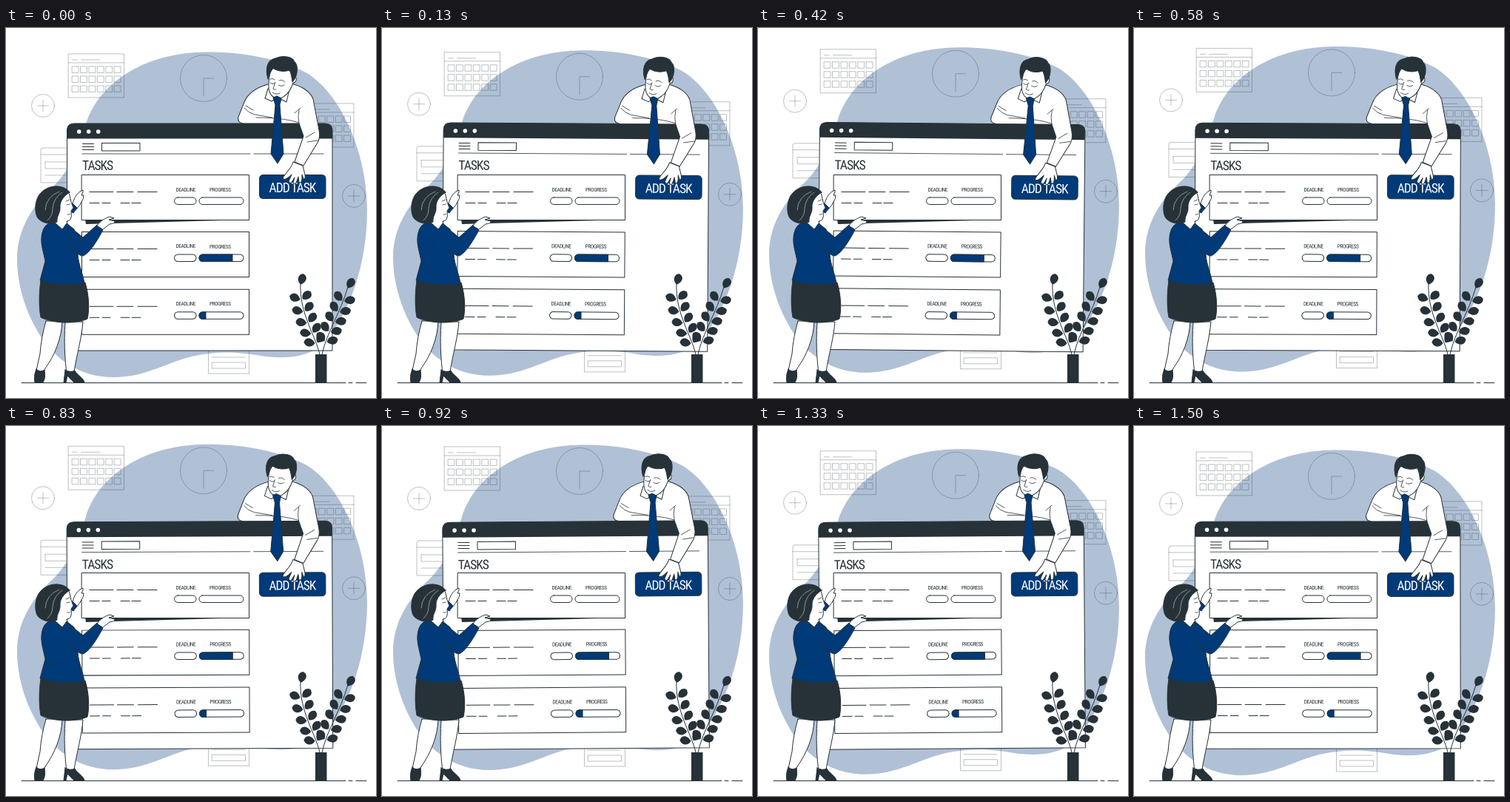
Recreate the animation shown at these times as an HTML page. Size 500 by 500 pixels, loop 1.54 s.

```html
<!DOCTYPE html>
<html lang="en">
<head>
<meta charset="utf-8">
<title>Task board</title>
<style>
  html, body { margin: 0; width: 100%; height: 100%; overflow: hidden; background: #fff; }
  svg { display: block; width: 100vw; height: 100vh; }
  text { font-family: "Roboto Condensed", Roboto, sans-serif; font-stretch: condensed; letter-spacing: -.06em; stroke: none; fill: #263238; }
  .small { font-size: 7.4px; }
  .big { font-size: 17.6px; }
  .line { fill: none; stroke: #263238; stroke-width: 1; stroke-linecap: round; stroke-linejoin: round; }
  .white, text.white { fill: #fff; }
  .blue { fill: #003a78; }
  .dark { fill: #263238; }
  .thin { stroke-width: .8; }
  .faint { stroke-opacity: .3; }
  .shine { stroke: #fff; stroke-opacity: .6; }
</style>
</head>
<body>
<svg viewBox="0 0 500 500">
  <defs>
    <g id="card" class="line">
      <path class="white" d="M102.5 198.5h226v61h-226z"/>
      <path d="M113 221.500h32m5 0h22m6 0h26M113 236.500h13m4 0h11m14 0h12m3 0h12"/>
      <text class="small" x="229.500" y="220.500">DEADLINE</text>
      <text class="small" x="275" y="220.500">PROGRESS</text>
      <rect x="227.500" y="229" width="29.500" height="9.500" rx="4.700"/>
      <rect x="261" y="229" width="60" height="9.500" rx="4.700"/>
    </g>
  </defs>

  <g id="backdrop">
    <path fill="#b0c1d6" d="M270 32.500C320 32 370 42 405 60C450 86 488 165 488 245C488 320 465 380 435 420C415 446 375 448 345 443C310 437 285 437 255 443C215 452 190 472 145 472C100 472 62 447 40 405C25 378 15 345 15 312C15 270 38 238 64 214C86 193 97 164 108 130C126 72 190 33 270 32.500Z"/>
    <g class="line faint">
      <g id="calendars"></g>
      <circle cx="267" cy="68" r="31.5"/>
      <path d="M281 68h-14v24"/>
      <circle cx="50" cy="105" r="15.5"/>
      <path d="M42.5 105h15M50 97.5v15"/>
      <circle cx="470" cy="227" r="15.5"/>
      <path d="M462 227h16M470 219v16"/>
      <path d="M100 162H50q-3 0-3 3v44h50M47 171h40M53 181h40M53 181v9h40M53 199h40"/>
      <path d="M273.5 420v47h55v-47M278.5 452h45v8h-45zM278 445h45"/>
    </g>
  </g>

  <path class="line" d="M21 479.5h438m4 0h5m5 0h14"/>

  <g id="board">
    <path class="line white" d="M82.5 436V139q0-10 10-10h338.500q10 0 10 10v297z"/>
    <path class="dark" d="M82.500 149.500v-10.500q0-10 10-10h338.500q10 0 10 10v10.500z"/>
    <g class="white">
      <circle cx="98.700" cy="140" r="2.800"/>
      <circle cx="111.700" cy="140" r="2.800"/>
      <circle cx="124.700" cy="140" r="2.800"/>
    </g>
    <path class="line" d="M103.500 156.500h15m-15 4h15m-15 4h15M129.500 155.500h51.500v10.500h-51.500z"/>
    <path class="line thin" d="M103 170h227m5 0h94"/>
    <text class="big" x="103" y="192.500">TASKS</text>
    <use href="#card" y="77"/>
    <use href="#card" y="154.800"/>
    <path class="line blue" d="M306 306h-40.300a4.700 4.700 0 0 0 0 9.500H306zM270 383.800h-4.300a4.700 4.700 0 0 0 0 9.500h4.300z"/>
    <rect class="line blue" x="342.500" y="198.500" width="89.500" height="32" rx="5"/>
    <text class="big white" x="387" y="222" text-anchor="middle">ADD TASK</text>

    <g class="line">
      <path class="white" d="M354 76C340 80 327 88 322 100L314 120Q312 128 321 129H396L402 146L390 181L402 186L421 155Q425 148 423 138L415 96C411 85 398 78 385 75Z"/>
      <path class="thin" d="M322 108Q328 115 336 117L360 121M338 121Q365 121 385 125L396 128M324 105l10 6M396 110Q394 120 396 130M398 108l-8 7M417 141l-12 7M421 152l-14 2"/>
      <path class="white" d="M354 82L350 95L359 99L367 94L379 100L384 79Z"/>
      <path class="white" d="M358 55C356 65 353 78 356 86C359 95 369 98 376 92C383 88 386 80 388 74C393 74 394 65 389 65L386 54Z"/>
      <path class="dark" d="M354 69C350 55 353 43 364 41C374 36 388 39 390 46C395 50 394 62 390 69L387 73C386 65 385 60 383 57C375 60 365 58 361 54C358 58 356 62 354 69Z"/>
      <path class="thin" d="M357 74q3 3 6 1M368 77q4 3 8 0M357 69q3-2 6 1M369 71q4-2 8 2M364 73l-3 9q2 2 4 1M360 87q5 4 10 1"/>
      <path class="blue" d="M361 94L366 92L372 95L370 104L375 170L367 183L358 170L364 104ZM364 104h6"/>
      <path class="white" d="M388 181C386 190 377 196 374 203C376 207 382 202 386 198L382 207Q384 212 387 207L390 202L388 209Q391 213 393 207L395 201L396 208Q399 211 400 204L400 198L402 204Q405 205 404 198L401 186Z"/>
    </g>
  </g>

  <path class="dark" d="M107 259H328L108 265Z"/>
  <use href="#card"/>

  <g class="line">
    <path class="white" d="M90 239C91 231 95 225 100 221L104 219Q105 221 102 226L105 226Q105 231 103 233Q100 240 95 245Z"/>
    <path class="blue" d="M90 237L96 243L91 250L85 247Z"/>
    <path class="white" d="M54 396H76C75 420 66 442 53 460L50 467L41 463L46 440C47 425 50 410 54 396ZM80 397H104C102 420 96 440 92 464L82 467C80 450 78 430 80 397Z"/>
    <path class="dark" d="M41 461C38 468 38 474 39 479H50C53 474 53 468 52 462Q46 466 41 461ZM80 462L78 479H81L83 470L92 479H106C104 472 97 470 93 463Q86 466 80 462Z"/>
    <path class="dark" d="M47 341Q75 350 107 344C112 360 113 380 110 393C95 400 65 400 47 391C44 375 45 355 47 341Z"/>
    <path class="white" d="M66 222C76 218 85 220 86 226L88 235L91 243L88 247C89 255 88 261 82 261L84 268L76 280L60 266Z"/>
    <path class="blue" d="M58 264C49 268 46 282 49 297L53 315L46 341Q70 350 106 345C104 332 98 320 97 306L92 272L82 264L76 272L66 263Z"/>
    <path class="blue" d="M88 270L104 283L123 266L131 273C122 290 112 305 104 308C98 308 90 300 84 290"/>
    <path class="white" d="M123 267C128 260 134 257 140 255L146 257L139 259L147 261Q148 264 140 265L131 272Z"/>
    <path class="dark" d="M86 222C78 211 58 211 47 223C38 232 38 252 44 258C50 264 62 266 69 262C68 254 74 250 73 241C73 234 78 227 86 222Z"/>
    <path class="thin" d="M81 234l5-2M82 239l4-1M83 252q3 1 4-1M53 315q6 8 14 10M97 306q-6-2-10-8"/>
    <path class="thin shine" d="M76 222Q64 230 63 244Q63 254 56 260M72 221Q54 228 53 246"/>
  </g>

  <g id="plant" class="dark"><path d="M418 441h15.500v38.500h-15.500z"/></g>
</svg>
<script>
const $ = id => document.getElementById(id);
const LOOP = 1540;

function calendar(x, y) {
  let d = `M${x} ${y}h75v59h-75zM${x + 5} ${y + 8}h7m5 0h25M${x} ${y + 12}h75`;
  for (let row = 0; row < 3; row++)
    for (let col = 0; col < 6; col++)
      d += `M${x + 5 + col * 11.4} ${y + 17 + row * 13}h8.5v8.5h-8.5z`;
  return `<path d="${d}"/>`;
}
$('calendars').innerHTML = calendar(84.5, 35) + calendar(395, 102);

// A curved stem with pairs of leaves and one leaf at the tip.
function branch(p) {
  const at = (axis, t) => {
    const u = 1 - t, [a, b, c, d] = p.map(q => q[axis]);
    return u * u * u * a + 3 * u * u * t * b + 3 * u * t * t * c + t * t * t * d;
  };
  let svg = `<path class="line" d="M${p[0]}C${p.slice(1).join(' ')}"/>`;
  const leaf = (t, turn) => {
    const x = at(0, t), y = at(1, t);
    const dir = Math.atan2(at(1, t + .01) - y, at(0, t + .01) - x) * 180 / Math.PI + turn;
    svg += `<path transform="translate(${x} ${y}) rotate(${dir})" d="M2 0C5 -7 14 -8 17 -1C16 7 7 7 2 0Z"/>`;
  };
  for (let t = .18; t < .9; t += .155) {
    leaf(t, -58);
    leaf(t, 58);
  }
  leaf(.97, 14);
  return svg;
}
$('plant').innerHTML += branch([[424, 441], [418, 415], [396, 385], [398, 345]])
                      + branch([[427, 441], [434, 410], [452, 385], [462, 350]]);

// Backdrop lift from 0 to 1 and back.
function lift(t) {
  return t < 735 ? Math.sin(Math.PI / 2 * t / 735)
                 : (1 + Math.cos(Math.PI * (t - 735) / (LOOP - 735))) / 2;
}

// Board tilt between 1 (clockwise) and -1.
function tilt(t) {
  if (t < 280) return t / 280;
  if (t < 1140) return 1 - 2 * (t - 280) / 860;
  return (t - LOOP) / (LOOP - 1140);
}

function draw() {
  const t = performance.now() % LOOP;
  $('backdrop').setAttribute('transform', `translate(0 ${-8 * lift(t)})`);
  $('board').setAttribute('transform', `rotate(${.8 * tilt(t)} 262 237)`);
  requestAnimationFrame(draw);
}
draw();
</script>
</body>
</html>
```
